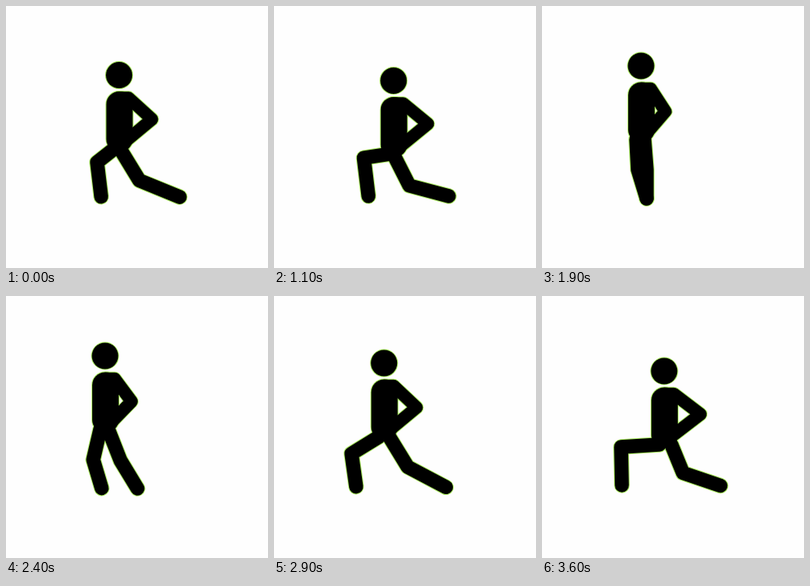
These frames come from a looping animation (328 px wide and 328 px high, 3700 ms). An HTML page:

```html
<!DOCTYPE html>
<html lang="en">
<head>
<meta charset="utf-8">
<title>Lunge</title>
<style>
  html, body { margin: 0; width: 100%; height: 100%; overflow: hidden; background: #fefefe; }
  svg { display: block; width: 100vw; height: 100vh; }
  g { fill: none; stroke-linecap: round; stroke-linejoin: round; }
</style>
</head>
<body>
<svg viewBox="0 0 328 328">
  <g id="glow"></g>
  <g id="figure"></g>
</svg>
<script>
const LOOP = 3700, STEP = 100;
const STAND = 1900;       // the figure is upright here
const ENTRY = 1090;       // the loop opens this far into a lunge
const BOTTOM = 1450;      // lowest point, counted from upright
const RISE = STAND + ENTRY - BOTTOM;

const stand = {
  head: [124, 75], elbow: [154.5, 132], hip: [128, 167],
  frontKnee: [120, 205], frontFoot: [131, 241],
  backKnee: [131, 205], backFoot: [131, 241],
};
// Feet apart, body not yet lowered
const longStride = {
  ...stand, elbow: [162, 132],
  frontKnee: [90, 205], frontFoot: [100, 240],
  backKnee: [165, 207.5], backFoot: [224, 241],
};
const shortStride = { ...longStride, frontKnee: [117, 205], frontFoot: [120, 240] };

const longLunge = {
  head: [153, 94], elbow: [198.5, 148], hip: [162, 186],
  frontKnee: [99, 189], frontFoot: [100, 237],
  backKnee: [176.5, 221.5], backFoot: [223.5, 237.5],
};
const shortLunge = {
  head: [152, 93.5], elbow: [195.5, 147.5], hip: [151, 185],
  frontKnee: [112, 190], frontFoot: [118, 238],
  backKnee: [170, 225], backFoot: [219, 238],
};

function ease(t, from, to) {
  const u = Math.min(1, Math.max(0, (t - from) / (to - from)));
  return u * u * (3 - 2 * u);
}

function poseAt(t) {
  const first = t < STAND;
  const stride = first ? shortStride : longStride;
  const lunge = first ? shortLunge : longLunge;
  const age = first ? t + ENTRY : t - STAND;

  // On the way up the body drifts back before it lifts and the feet close
  const up = Math.max(0, (age - BOTTOM) / RISE);
  const drift = 1 - up ** 3.4, lift = 1 - up ** 7;
  const sink = ease(age, 580, BOTTOM);
  const step = ease(age, 0, 1230) * lift;
  const lower = [sink * drift, sink * lift];

  const pose = {};
  for (const joint in stand) {
    pose[joint] = stand[joint].map((v, axis) => {
      const wide = stride[joint][axis];
      return v + step * (wide - v) + lower[axis] * (lunge[joint][axis] - wide);
    });
  }
  return pose;
}

function addShapes(layer, color, extra) {
  const make = (tag, attrs) => {
    const el = document.createElementNS("http://www.w3.org/2000/svg", tag);
    set(el, attrs);
    layer.append(el);
    return el;
  };
  const limb = width => make("polyline", { stroke: color, "stroke-width": width + extra });
  const solid = { fill: color, stroke: color, "stroke-width": extra };
  return {
    head: make("circle", { r: 16.5, ...solid }),
    torso: make("rect", { width: 33, rx: 16, ...solid }),
    arm: limb(15.5),
    front: limb(17.5),
    back: limb(17.5),
  };
}

function set(el, attrs) {
  for (const name in attrs) el.setAttribute(name, attrs[name]);
}

const layers = [
  addShapes(document.getElementById("glow"), "#a8ea5e", 2),
  addShapes(document.getElementById("figure"), "#000", 0),
];

function draw(t) {
  const p = poseAt(t);
  const [x, y] = p.head;
  const top = y + 20.5, hip = y + 92, shoulder = top + 8;
  const arm = [x, shoulder, x + 12, shoulder, ...p.elbow, x + 9, y + 82];
  const front = [x - 6, hip, ...p.frontKnee, ...p.frontFoot];
  const back = [...p.hip, ...p.backKnee, ...p.backFoot];
  for (const part of layers) {
    set(part.head, { cx: x, cy: y });
    set(part.torso, { x: x - 16, y: top, height: hip + 4 - top });
    set(part.arm, { points: arm });
    set(part.front, { points: front });
    set(part.back, { points: back });
  }
}

const start = performance.now();
function tick() {
  const t = (performance.now() - start) % LOOP;
  draw(Math.floor(t / STEP) * STEP);
  requestAnimationFrame(tick);
}
tick();
</script>
</body>
</html>
```
